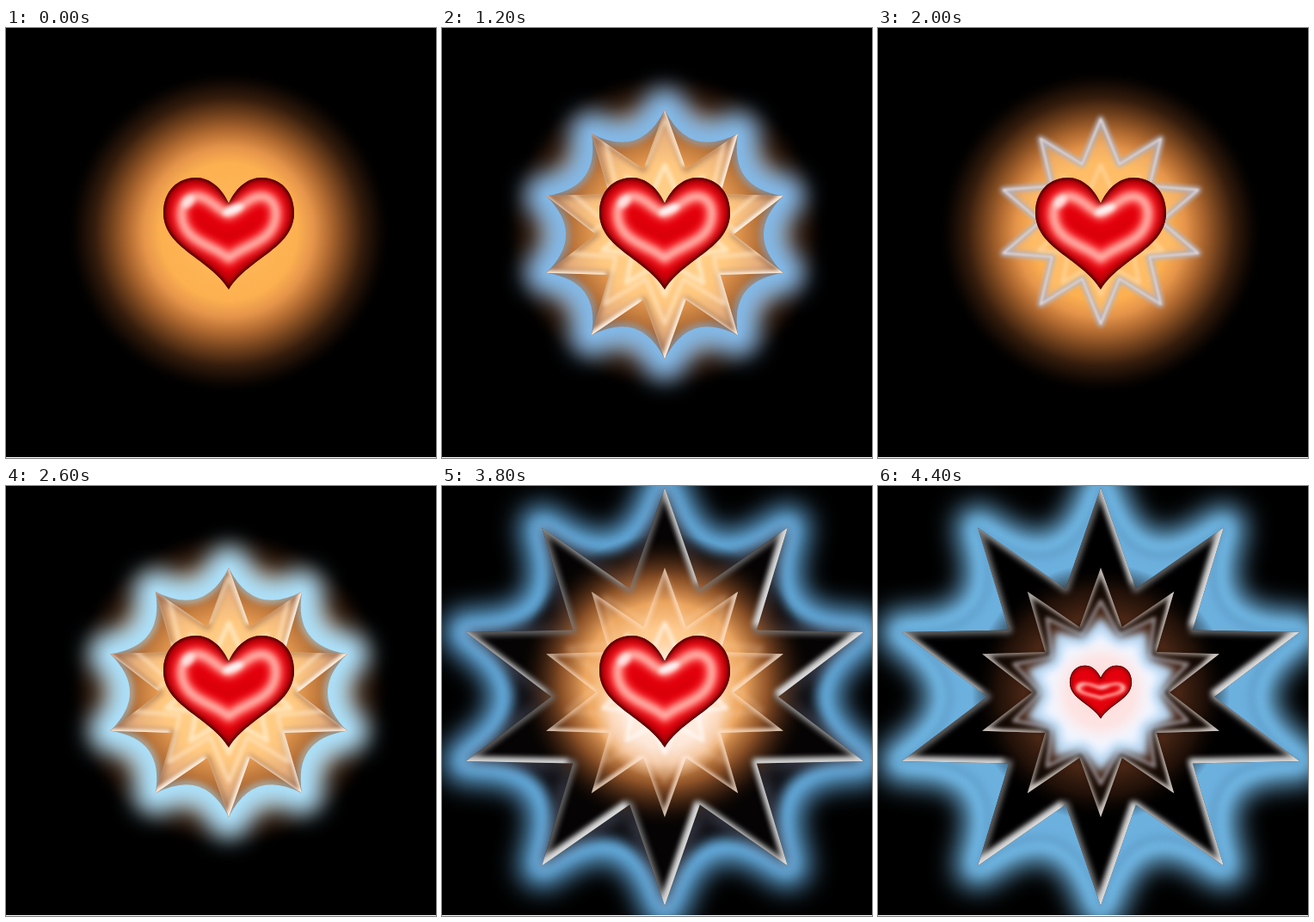
Write an HTML page with a canvas that moves like this. It is 500x500 px and loops after 4.6 s.

```html
<!DOCTYPE html>
<html>
<head>
<meta charset="utf-8">
<style>
html, body { margin: 0; width: 100%; height: 100%; overflow: hidden; background: #000; }
canvas { display: block; }
</style>
</head>
<body>
<canvas id="stage" width="500" height="500"></canvas>
<script>
const ctx = document.getElementById('stage').getContext('2d');
const CX = 259;

const polar = (cy, i, d) => [CX + d * Math.sin(i * Math.PI / 10), cy - d * Math.cos(i * Math.PI / 10)];

function spikes(cy, R, r) {
  const p = new Path2D();
  for (let i = 0; i < 20; i++) p.lineTo(...polar(cy, i, i % 2 ? r : R));
  p.closePath();
  return p;
}

// Ten tips joined by concave curves
function scallop(cy, R, c) {
  const p = new Path2D();
  p.moveTo(...polar(cy, 0, R));
  for (let i = 1; i < 20; i += 2) p.quadraticCurveTo(...polar(cy, i, c), ...polar(cy, i + 1, R));
  p.closePath();
  return p;
}

const heartPath = new Path2D('M0-36C-8-54-22-66-38-66C-60-66-76-50-76-25C-76 16-22 28 0 64C22 28 76 16 76-25C76-50 60-66 38-66C22-66 8-54 0-36Z');
const heartRing = new Path2D('M0-24C-11-26-24-46-40-44C-58-41-60-14-44 1C-31 13-12 17 0 28C12 17 31 13 44 1C60-14 58-41 40-44C24-46 11-26 0-24Z');
const bigStar = spikes(245, 243, 132), bigScallop = scallop(245, 243, 122);
const midStar = spikes(240, 145, 80), midScallop = scallop(240, 145, 92);
const lineStar = spikes(225, 119, 70), coreStar = spikes(235, 76, 46);

function soft(blur, draw) {
  ctx.save();
  if (blur) ctx.filter = `blur(${blur}px)`;
  draw();
  ctx.restore();
}

function line(path, color, width, blur = 0) {
  soft(blur, () => {
    ctx.strokeStyle = color;
    ctx.lineWidth = width;
    ctx.lineJoin = 'round';
    ctx.stroke(path);
  });
}

function fill(path, color, blur = 0) {
  soft(blur, () => { ctx.fillStyle = color; ctx.fill(path); });
}

function inside(path, draw) {
  ctx.save();
  ctx.clip(path);
  draw();
  ctx.restore();
}

// Lights the inner edges that face the lower right
function bevel(path, color, offset, blur) {
  const around = new Path2D('M-99-99H699V699H-99Z');
  around.addPath(path);
  inside(path, () => soft(blur, () => {
    ctx.translate(-offset, -offset);
    ctx.fillStyle = color;
    ctx.fill(around, 'evenodd');
  }));
}

function wash(style) {
  ctx.fillStyle = style;
  ctx.fillRect(0, 0, 500, 500);
}

function radial(cy, radius, stops) {
  const g = ctx.createRadialGradient(CX, cy, 0, CX, cy, radius);
  stops.forEach(([p, c]) => g.addColorStop(p, c));
  return g;
}

function warmGlow(radius) {
  wash(radial(237, radius, [[0, '#ffbc5c'], [.42, '#fdb050'], [.52, '#e5944a'], [.62, '#b06930'],
    [.72, '#71411c'], [.82, '#341c0c'], [.91, '#120904'], [1, 'rgba(0,0,0,0)']]));
}

function shine(x, y, rx, ry, turn, alpha) {
  soft(2.5, () => {
    ctx.fillStyle = `rgba(255,255,255,${alpha})`;
    ctx.beginPath();
    ctx.ellipse(x, y, rx, ry, turn, 0, 7);
    ctx.fill();
  });
}

function heart(scale) {
  ctx.save();
  ctx.translate(CX, 240);
  ctx.scale(scale, scale);
  ctx.clip(heartPath);
  fill(heartPath, '#e4000c');
  line(heartPath, '#a00008', 12, 4 * scale);
  line(heartPath, '#4a0000', 4, 1.5 * scale);
  // The glossy ring flattens as the heart shrinks
  ctx.scale(1, scale);
  line(heartRing, '#ff5a58', 17, 4 * scale);
  line(heartRing, '#ffb9b0', 7, 3 * scale);
  fill(new Path2D('M-36-22C-22-14-12-4 0-4C12-4 22-14 36-22C34-4 12-2 0 7C-12-2-34-4-36-22Z'), '#d8000a', 3 * scale);
  shine(5, -29, 13, 5, -.4, .9);
  shine(-47, -38, 9, 6, -.8, .7);
  ctx.restore();
}

function thinStar() {
  fill(lineStar, 'rgba(255,200,125,.5)', 3);
  line(lineStar, 'rgba(175,182,205,.9)', 7, 2.5);
  line(lineStar, '#e6d8d4', 2, 1);
  line(coreStar, 'rgba(255,225,180,.6)', 4, 2);
}

function bevelStar(alpha = 1) {
  ctx.save();
  ctx.globalAlpha = alpha;
  inside(midStar, () => {
    wash(radial(238, 145, [[0, '#ffd894'], [.55, '#ffc880'], [.78, '#e8b07c'], [1, '#a98670']]));
    line(midStar, 'rgba(140,90,60,.5)', 8, 3);
    line(lineStar, 'rgba(255,232,200,.7)', 4, 2);
  });
  bevel(midStar, '#fff0e0', 3, 2);
  line(coreStar, 'rgba(255,238,205,.8)', 5, 2);
  ctx.restore();
}

function blueStar(color) {
  line(midScallop, color, 50, 13);
  inside(midScallop, () => wash(radial(238, 150, [[0, '#ffc46c'], [.5, '#f2a557'], [.72, '#b97339'], [1, '#6b4530']])));
  line(midScallop, color, 5, 4);
  bevelStar();
}

function bigEdge() {
  inside(bigStar, () => line(bigStar, 'rgba(125,125,125,.8)', 9, 3));
  bevel(bigStar, '#ddd', 5, 3);
}

function midEdge(color) {
  inside(midStar, () => line(midStar, color, 6, 2.5));
  bevel(midStar, color, 3, 2);
}

function whiteCore(radius, alpha) {
  ctx.save();
  ctx.globalAlpha = alpha;
  wash(radial(260, radius, [[0, '#fff'], [.55, '#fff4f4'], [.78, 'rgba(255,240,238,.65)'], [1, 'rgba(255,225,200,0)']]));
  ctx.restore();
}

function bigOutline(white) {
  fill(bigStar, '#000');
  warmGlow(180);
  bigEdge();
  bevelStar(.75);
  if (white) whiteCore(90, .65);
}

function outerBlue(color) {
  line(bigScallop, color, 52, 15);
  line(bigScallop, color, 18, 8);
}

function warmBurst(white) {
  outerBlue('#69b4e8');
  fill(bigScallop, '#111116', 7);
  line(bigStar, 'rgba(120,130,155,.35)', 14, 7);
  fill(bigStar, '#050303');
  wash(radial(228, 172, [[0, '#ffe6c8'], [.36, '#ffcb90'], [.54, '#eba45e'], [.7, 'rgba(166,96,46,.85)'],
    [.85, 'rgba(70,38,18,.6)'], [1, 'rgba(0,0,0,0)']]));
  bigEdge();
  midEdge('rgba(255,230,210,.6)');
  line(lineStar, 'rgba(255,222,190,.25)', 5, 3);
  whiteCore(82, white);
  line(coreStar, 'rgba(255,255,255,.7)', 4, 2);
}

function coldBurst() {
  outerBlue('#74bdeb');
  fill(bigScallop, '#6cb0de', 5);
  line(bigScallop, 'rgba(75,125,165,.4)', 8, 5);
  fill(bigStar, '#000');
  wash(radial(240, 150, [[0, '#5a2d16'], [.6, '#4a2716'], [.8, 'rgba(40,20,10,.8)'], [1, 'rgba(0,0,0,0)']]));
  bigEdge();
  midEdge('rgba(225,215,210,.75)');
  line(spikes(240, 122, 72), 'rgba(10,6,4,.7)', 7, 3);
  line(spikes(240, 106, 70), 'rgba(205,205,215,.6)', 4, 2);
  fill(spikes(242, 90, 70), '#bcdaf4', 5);
  fill(spikes(242, 72, 58), '#f0f5ff', 5);
  wash(radial(240, 62, [[0, '#ffd8d4'], [.65, 'rgba(255,226,224,.85)'], [1, 'rgba(255,240,240,0)']]));
}

const blue = () => blueStar('#83b9e8'), bright = () => blueStar('#ace0fa');
const outline = () => bigOutline(false);
const none = () => {};
// One scene every 200 ms
const scenes = [none, none, none, thinStar, () => bevelStar(.85), thinStar, blue, thinStar, bright,
  outline, thinStar, blue, outline, bright, bright, outline, blue, outline,
  () => bigOutline(true), () => warmBurst(.75), () => warmBurst(.9), coldBurst, coldBurst];

let shown = -1;
function frame() {
  const step = Math.floor(performance.now() % 4600 / 200);
  if (step !== shown) {
    shown = step;
    const flare = step === 1;
    wash('#000');
    if (step < 19) warmGlow(flare ? 300 : 190);
    scenes[step]();
    heart(step === 21 ? .73 : step === 22 ? .475 : 1);
    if (!flare) {
      ctx.fillStyle = '#fff';
      ctx.fillRect(0, 499, 500, 1);
    }
  }
  requestAnimationFrame(frame);
}
frame();
</script>
</body>
</html>
```
